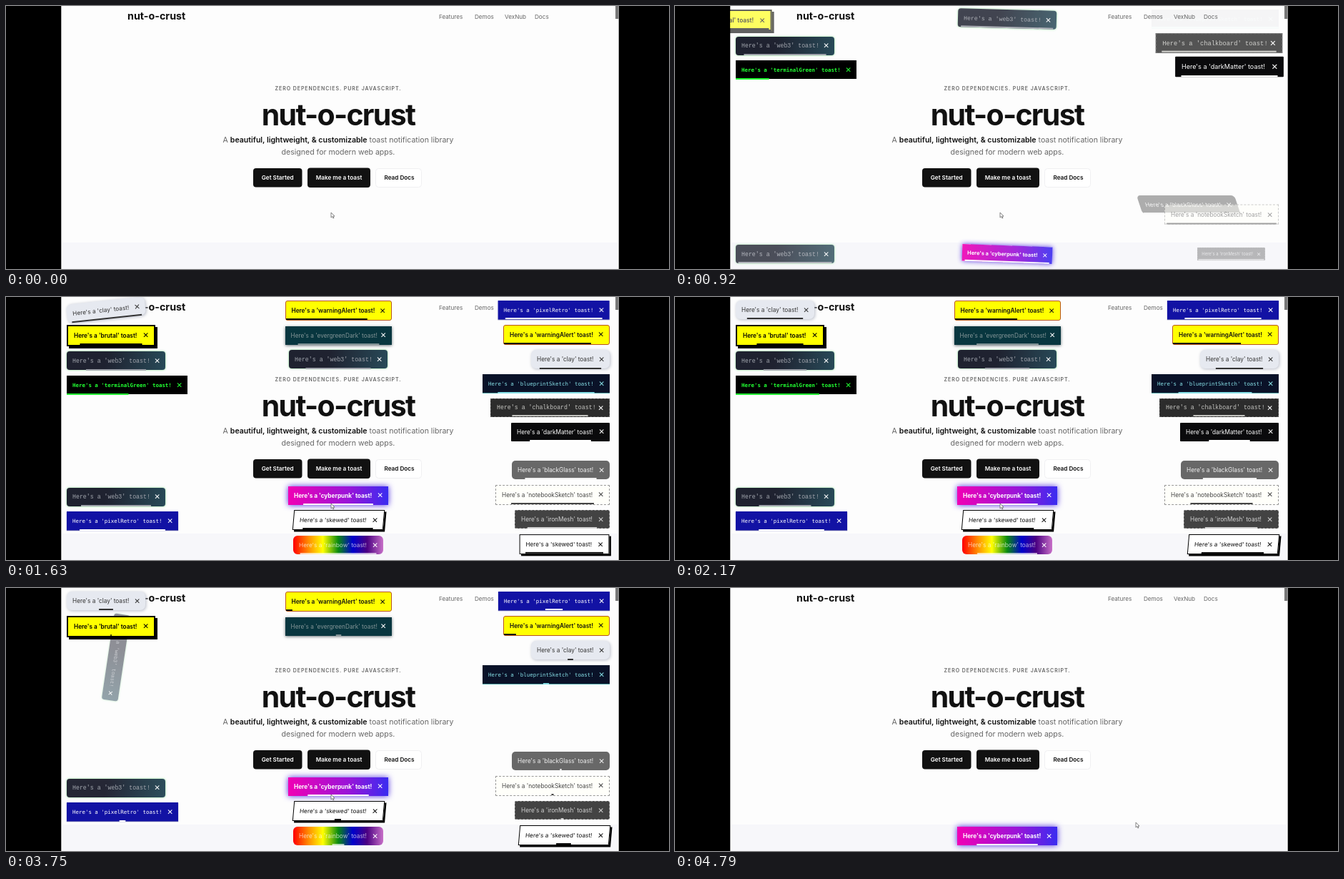
An HTML page for the animation above (4.83 s loop, 928 px wide and 368 px high).

```html
<!DOCTYPE html>
<html lang="en">
<head>
<meta charset="utf-8">
<title>Toast showcase</title>
<style>
  html, body { margin: 0; width: 100%; height: 100%; overflow: hidden; background: #000; }
  body { position: relative; font-family: Inter, sans-serif; }
  svg { position: absolute; left: 0; top: 0; }
  #layer { position: absolute; left: 0; top: 0; width: 928px; height: 368px; clip-path: inset(0 75px 0 77px); }
  .toast {
    position: absolute; left: 0; top: 0; box-sizing: border-box; padding: 0 7px 0 8px;
    display: flex; align-items: center; justify-content: space-between;
    white-space: nowrap; font-size: 8.25px; color: #fff;
  }
  .toast b { font: 10.5px/1 "DejaVu Sans", sans-serif; }
  .toast i { position: absolute; left: 0; bottom: 0; width: 100%; height: 1.6px; background: currentColor; }
  .web3, .chalkboard { font-family: "Liberation Mono", monospace; }
  .terminalGreen, .pixelRetro, .blueprintSketch { font-family: "DejaVu Sans Mono", monospace; font-size: 7.45px; }
  .clay { background: #e6e9f0; color: #333; border-radius: 7px; box-shadow: 1px 1px 4px #b8bcc8; }
  .brutal { background: #ff0; color: #000; border: 2px solid #000; box-shadow: 3px 3px #000; font-weight: 600; }
  .web3 { background: linear-gradient(100deg, #1f2230 40%, #284a58); color: #a0a4ac; border-radius: 4px; box-shadow: 0 0 3px #7fdc8c; }
  .web3 b, .evergreenDark b, .chalkboard b, .rainbow b { color: #fff; }
  .terminalGreen { background: #000; color: #2f3; font-weight: 600; }
  .warningAlert { background: #ff0; color: #111; border: 1.5px solid #b8541c; border-radius: 3px; font-weight: 600; }
  .evergreenDark { background: #08363f; color: #839496; box-shadow: 0 1px 4px #667075; }
  .pixelRetro { background: #1212a4; box-shadow: 0 1px 1px #55a; }
  .blueprintSketch { background: #0a1228; color: #86dfe6; box-shadow: 0 1px #5aa; }
  .chalkboard { background: #2c2c2c; color: #c4c4c0; border: 1px dashed #555; }
  .darkMatter { background: #0a0a0c; border-radius: 1px; }
  .blackGlass { background: #686868; color: #f0f0f0; border-radius: 5px; }
  .notebookSketch { background: #fffffa; color: #444; border: 1px dashed #999; }
  .ironMesh { background: #434343; color: #d2d2d2; border: 1px dashed #888; border-radius: 2px; }
  .skewed { background: #fff; color: #111; border: 1.5px solid #000; box-shadow: 2.5px 2.5px #000; }
  .cyberpunk { background: linear-gradient(90deg, #f000b4, #9a14d8 60%, #3a2cf0); font-weight: 700; box-shadow: 0 0 8px #4a28e0; }
  .rainbow { background: linear-gradient(90deg, #f00, #ff8c00 17%, #ff0 33%, #0a8a10 50%, #00c 66%, #4b0082 82%, #c870c8); color: #ffffffb0; border-radius: 6px; }
</style>
</head>
<body>
<svg width="928" height="368" viewBox="0 0 928 368" font-family="Inter, sans-serif" fill="#111">
  <rect x="77" width="781" height="368" fill="#fdfdfd"/>
  <rect x="77" y="331" width="781" height="37" fill="#f7f7fa"/>
  <path d="M77.5 0V368M857.5 0V368" stroke="#b4b4b4"/>
  <rect x="853" width="4.5" height="18" fill="#777"/>
  <text x="170" y="19" font-size="14.3" font-weight="700">nut-o-crust</text>
  <g font-size="8.15" fill="#666">
    <text x="606" y="17.5">Features</text>
    <text x="656" y="17.5">Demos</text>
    <text x="698" y="17.5">VexNub</text>
    <text x="740" y="17.5">Docs</text>
  </g>
  <g text-anchor="middle">
    <text x="465" y="117.5" font-size="7" font-weight="600" letter-spacing=".95" fill="#666">ZERO DEPENDENCIES. PURE JAVASCRIPT.</text>
    <text x="465" y="166.5" font-size="41" font-weight="700" letter-spacing="-1.7">nut-o-crust</text>
    <g font-size="10.55" fill="#666">
      <text x="465" y="190.5">A <tspan font-weight="600" fill="#111">beautiful, lightweight, &amp; customizable</tspan> toast notification library</text>
      <text x="465" y="207.5">designed for modern web apps.</text>
    </g>
    <rect x="346" y="227" width="68.5" height="26.5" rx="4"/>
    <rect x="422" y="226.5" width="88" height="27.5" rx="4"/>
    <rect x="517.5" y="227.5" width="64" height="26" rx="4" fill="#fff" stroke="#f0f0f2"/>
    <g font-size="8.2" font-weight="600" fill="#fff">
      <text x="380.2" y="243">Get Started</text>
      <text x="466" y="243">Make me a toast</text>
      <text x="550.5" y="243" fill="#111">Read Docs</text>
    </g>
  </g>
</svg>
<div id="layer"></div>
<svg width="928" height="368"><path id="cursor" d="M0 0V7L1.7 5.5L2.9 8L4 7.5L2.9 5.1H5Z" fill="#fff" stroke="#666" stroke-width=".8"/></svg>
<script>
const LOOP = 4830, ENTER = 500, LEAVE = 400, LIFE = 2970, GAP = 7.7;

const WIDTHS = {
  web3: 138, terminalGreen: 169, brutal: 124, clay: 110, warningAlert: 149, evergreenDark: 149,
  pixelRetro: 156, blueprintSketch: 178, chalkboard: 167, darkMatter: 138, blackGlass: 137,
  notebookSketch: 160, ironMesh: 133, skewed: 127, cyberpunk: 140, rainbow: 126, spacer: 100,
};
const HEIGHTS = { brutal: 30, warningAlert: 28, skewed: 28, notebookSketch: 28 };

// Each takes q, going from 1 to 0 with an ease-out, and the linear progress p.
const enters = {
  fade: () => '',
  left: q => `translateX(${-150 * q}px)`,
  speedLeft: q => `translateX(${-104 * q}px) skewX(${33 * q}deg)`,
  speedRight: q => `translateX(${140 * q}px) skewX(${-35 * q}deg)`,
  drop: q => `translateY(${-35 * q}px)`,
  zoom: q => `scale(${1 - 0.4 * q})`,
  pop: (q, p) => `scale(${1 + 2.7 * (p - 1) ** 3 + 1.7 * (p - 1) ** 2})`,
  flip: q => `perspective(300px) rotateY(${90 * q}deg)`,
  spin: q => `rotate(${-120 * q}deg)`,
  tilt: q => `rotate(${5 * q}deg)`,
  roll: q => `rotate(${8 * q}deg) scale(${1 - 0.4 * q})`,
};
const leaves = {
  fade: () => '',
  fold: p => `perspective(300px) rotateX(${120 * p}deg)`,
  spin: p => `translateY(${16 * p}px) rotate(${196 * p}deg) scale(${1 - 0.24 * p})`,
  zoom: p => `scale(${1 - 0.6 * p})`,
  drop: p => `translateY(${40 * p * p}px)`,
  right: p => `translateX(${150 * p * p}px)`,
  left: p => `translateX(${-150 * p * p}px)`,
};

// corner, theme, start, enter, leave, life
const toasts = [
  ['tl', 'terminalGreen', 90, 'fade', 'fold', 3010],
  ['tl', 'web3', 400, 'zoom', 'spin', 3150],
  ['tr', 'darkMatter', 630, 'pop', 'zoom', 2640],
  ['tr', 'chalkboard', 698, 'pop', 'right', 2615],
  ['bc', 'cyberpunk', 735, 'roll', 'fade', LOOP],
  ['tc', 'web3', 755, 'tilt', 'fold', 2575],
  ['bl', 'web3', 770, 'fade', 'fade', LIFE],
  ['tl', 'brutal', 815, 'left', 'left', LIFE],
  ['br', 'blackGlass', 832, 'speedLeft', 'right', LIFE],
  ['br', 'notebookSketch', 839, 'drop', 'drop', LIFE],
  ['br', 'ironMesh', 867, 'zoom', 'zoom', LIFE],
  ['tr', 'blueprintSketch', 917, 'fade', 'fold', LIFE],
  ['tc', 'evergreenDark', 930, 'zoom', 'fade', LIFE],
  ['bl', 'pixelRetro', 945, 'flip', 'left', LIFE],
  ['tc', 'warningAlert', 960, 'drop', 'zoom', LIFE],
  ['tr', 'clay', 990, 'fade', 'spin', LIFE],
  ['bc', 'skewed', 1000, 'fade', 'drop', LIFE],
  ['tr', 'warningAlert', 1122, 'speedRight', 'right', LIFE],
  ['bc', 'rainbow', 1178, 'spin', 'spin', LIFE],
  ['bl', 'spacer', 1200, 'fade', 'fade', LIFE],
  ['tr', 'pixelRetro', 1242, 'flip', 'fold', LIFE],
  ['br', 'skewed', 1275, 'zoom', 'zoom', LIFE],
  ['tl', 'clay', 1316, 'spin', 'left', LIFE],
].map(([corner, theme, start, enter, leave, life]) => {
  const el = document.createElement('div');
  const width = WIDTHS[theme], height = HEIGHTS[theme] || 26;
  el.className = 'toast ' + theme;
  el.innerHTML = `<span>Here's a '${theme}' toast!</span><b>✕</b><i></i>`;
  el.style.width = width + 'px';
  el.style.height = height + 'px';
  el.style.left = { l: 85, c: 465 - width / 2, r: 845 - width }[corner[1]] + 'px';
  document.getElementById('layer').append(el);
  const bar = el.lastChild;
  if (/terminalGreen|warningAlert/.test(theme)) bar.style.transformOrigin = 'left';
  return { corner, theme, start, enter, leave, life, height, el, bar };
});

const clamp = x => Math.min(1, Math.max(0, x));

function pose(toast, t) {
  const age = t - toast.start;
  if (age < ENTER) {
    const p = age / ENTER, q = (1 - p) ** 3;
    const gain = toast.enter === 'pop' ? 1.8 * p : (1 - q) * 1.2;
    return [enters[toast.enter](q, p), clamp(gain)];
  }
  const rest = toast.theme === 'skewed' ? 'skewX(-5deg) ' : '';
  if (age < toast.life) return [rest, 1];
  const p = (age - toast.life) / LEAVE;
  return [rest + leaves[toast.leave](p), 1 - p];
}

function render(t) {
  const offsets = {};
  // Newest toasts sit nearest to the screen edge.
  for (const toast of [...toasts].reverse()) {
    const { corner, theme, start, life, height, el, bar } = toast;
    const shown = t >= start && t < start + life + LEAVE;
    el.style.display = shown && theme !== 'spacer' ? '' : 'none';
    if (!shown) continue;
    const offset = offsets[corner] || 0;
    offsets[corner] = offset + height + GAP;
    const [transform, opacity] = pose(toast, t);
    el.style.top = (corner[0] === 't' ? 5 + offset : 360 - height - offset) + 'px';
    el.style.transform = transform;
    el.style.opacity = opacity;
    const done = clamp((t - start) / life);
    const fill = theme === 'terminalGreen' ? done
      : theme === 'cyberpunk' ? Math.max(0.61, 1 - (t - start) / LIFE) : 1 - done;
    bar.style.transform = `scaleX(${fill})`;
  }
  const m = clamp((t - 4350) / 380), k = m * m * (3 - 2 * m);
  document.getElementById('cursor').setAttribute('transform', `translate(${455 + 190 * k} ${289 + 39 * k})`);
}

const begin = performance.now();
(function frame() {
  render((performance.now() - begin) % LOOP);
  requestAnimationFrame(frame);
})();
</script>
</body>
</html>
```
